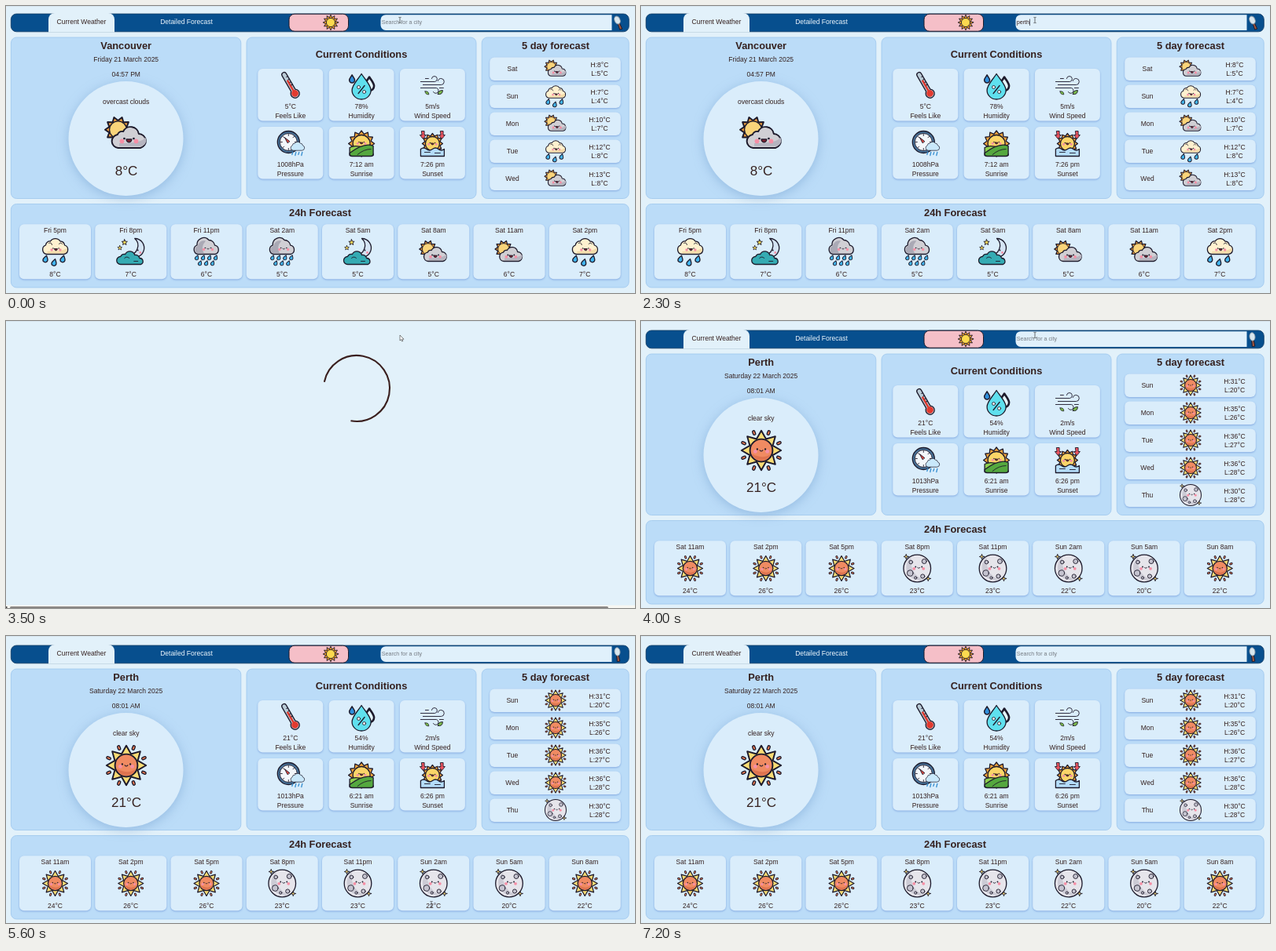
Animation of 800 by 366 pixels, one loop 7300 ms. Source, as an HTML page:

```html
<!DOCTYPE html>
<html lang="en">
<head>
<meta charset="utf-8">
<title>Weather dashboard</title>
<style>
  html, body { margin: 0; width: 100%; height: 100%; overflow: hidden; background: #e2f1fa; }
  svg { display: block; width: 800px; height: 366px; }
  text { font-family: "Liberation Sans", Arial, sans-serif; font-size: 8.53px; fill: #35211f; }
  .mid { text-anchor: middle; }
  .title { font-size: 12.8px; font-weight: bold; }
  .big { font-size: 17.06px; }
  .small { font-size: 7.11px; }
  .panel { fill: #bbdcf8; stroke: #9dc7ee; stroke-width: .8; }
  .card { fill: #daedfb; filter: drop-shadow(0 1.8px .8px #6d94d6b0); }
  .disc { fill: #daedfb; filter: drop-shadow(0 3px 7px #6f9ccc80); }
  .line { stroke: #1d1a2b; stroke-width: 1.3; stroke-linejoin: round; stroke-linecap: round; }
  .thin { stroke-width: .9; }
  .bare { fill: none; }
</style>
</head>
<body>
<svg id="stage" viewBox="0 0 800 366"></svg>
<script>
const LOOP = 7300, LOAD = 3100, SHOW = 3900;
const INK = '#1d1a2b';

// Drawing helpers
const label = (x, y, s, cls = 'mid', extra = '') => `<text x="${x}" y="${y}" class="${cls}" ${extra}>${s}</text>`;
const box = (x, y, w, h, r, cls) => `<rect x="${x}" y="${y}" width="${w}" height="${h}" rx="${r}" class="${cls}"/>`;
const shape = (d, fill, cls = 'line') => `<path d="${d}" fill="${fill}" class="${cls}"/>`;
const dot = (x, y, r, fill, cls = '') => `<circle cx="${x}" cy="${y}" r="${r}" fill="${fill}" class="${cls}"/>`;
const put = (x, y, s, body, turn = 0) => `<g transform="translate(${x} ${y}) rotate(${turn}) scale(${s})">${body}</g>`;
const icon = (name, x, y, s = 1) => `<use href="#${name}" transform="translate(${x} ${y}) scale(${s})"/>`;
const polar = (r, deg) => {
  const a = deg * Math.PI / 180;
  return (r * Math.cos(a)).toFixed(2) + ' ' + (r * Math.sin(a)).toFixed(2);
};
const star = (n, outer, inner, turn = 0) => {
  let d = '';
  for (let i = 0; i < 2 * n; i++) d += (i ? 'L' : 'M') + polar(i % 2 ? inner : outer, turn + i * 180 / n);
  return d + 'Z';
};
const ring = (n, r1, r2, turn = 0) => {
  let d = '';
  for (let i = 0; i < n; i++) d += `M${polar(r1, turn + i * 360 / n)}L${polar(r2, turn + i * 360 / n)}`;
  return d;
};
const drop = (x, y, s, fill, turn = 0) =>
  put(x, y, s, shape('M0-4C1.5-1.5 3 0 3 1.8A3 3 0 0 1-3 1.8C-3 0-1.5-1.5 0-4Z', fill), turn);

const face = (x, y, s = 1, open = true) => put(x, y, s,
  dot(-6, 2.3, 1.9, '#f58fa5') + dot(6, 2.3, 1.9, '#f58fa5') +
  dot(-4, 0, .9, INK) + dot(4, 0, .9, INK) +
  (open ? shape('M-2.2 .6H2.2A2.2 2.6 0 0 1-2.2 .6Z', '#7d2432', 'line thin')
        : shape('M-1.5 1Q0 3 1.5 1', 'none', 'line thin')));

const CLOUD = 'M-7 12A5.7 5.7 0 0 1-7.5 .7A4.5 4.5 0 0 1-2.6-2A7 7 0 0 1 10.6 0A6.1 6.1 0 0 1 12 12Z';
const PUFF = 'M-11 3A6 6 0 0 1-12-8.5A5.5 5.5 0 0 1-6-13.5A7.4 7.4 0 0 1 6.5-13.5A5.8 5.8 0 0 1 12-8.5A5.9 5.9 0 0 1 11 3Z';
const GRAY = 'M-11 3A6 6 0 0 1-12-8.5A8.6 8.6 0 0 1 3-15A8 8 0 0 1 10.5-8.3A5.8 5.8 0 0 1 11 3Z';
const TWINKLE = star(4, 3.2, 1.1);
const STAR = star(5, 3.8, 1.7, -90);

const icons = {
  overcast:
    put(-7, -3.5, 1, shape(star(10, 11, 7.8), '#f4a23e') + dot(0, 0, 7.3, '#fad47a', 'line thin')) +
    shape(CLOUD, '#d0cfd4') + shape('M-6 10.5H12A4.8 4.8 0 0 0 16 3Q14 8-6 8Z', '#b5b4bf', '') + face(2.3, 4),
  showers:
    shape(PUFF, '#fff1cf') + shape('M-10 1.7H11A4.7 4.7 0 0 0 15-5Q12-1-10-.5Z', '#f3dba9', '') +
    shape('M-8-11Q-5-13-4-9M5-10Q7-13 9-10', 'none', 'line thin') + face(1, -4.5, .9) +
    drop(-12, 8.5, 1, '#42b4ee', 15) + drop(-1, 13, 1, '#42b4ee', 15) + drop(10, 8.5, 1, '#42b4ee', 15),
  rain:
    shape(GRAY, '#d0cfd4') + shape('M-11 2A5 5 0 0 1-11-7.5A8 8 0 0 1-1-14Q-8-6-3 2Z', '#aaa9b5', '') +
    face(2, -5, .9, false) +
    [[-12, 7], [-4, 7], [4, 7], [12, 7], [-8, 14], [0, 14], [8, 14]].map(p => drop(...p, .72, '#42b4ee', 20)).join(''),
  night:
    shape('M5-17A12 12 0 1 1-3 4A12 12 0 0 0 5-17Z', '#d4e4f4') +
    dot(9, -2, .9, INK) + dot(12, 1, 1.4, '#f58fa5') +
    put(-8, -12, 1, shape(STAR, '#f9dc58', 'line thin')) + put(-14, -5, .8, shape(STAR, '#f9dc58', 'line thin')) +
    shape('M-13 16A5 5 0 0 1-13 6A5 5 0 0 1-7 3A6.5 6.5 0 0 1 5 4A5 5 0 0 1 11 8A4.2 4.2 0 0 1 13 16Z', '#35abb3') +
    shape('M-8 8Q-5 5-2 8M4 12H9', 'none', 'line thin'),
  sun:
    shape(ring(8, 15.3, 17, 22.5), 'none', 'line" stroke-width="3" style="stroke-width:3') +
    `<path d="${ring(8, 15.3, 17, 22.5)}" stroke="#ee7d54" stroke-width="1.2" stroke-linecap="round"/>` +
    shape(star(8, 16.8, 10.5), '#f9dc74') + dot(0, 0, 9.6, '#f08b62', 'line') +
    shape('M-8 3A8.6 8.6 0 0 0 8 3Q2 8-8 3Z', '#df7450', '') + face(0, -1, .85, false),
  moon:
    dot(0, 0, 17.3, '#e6e5eb', 'line') +
    shape('M-8-14A16.5 16.5 0 0 0 8 14.2Q-9 8-8-14Z', '#cccbd5', '') +
    [[-9, 6, 3.8], [7, 10, 2.6], [9, -9, 3], [-8, -8, 2.3], [-2, 12, 1.6]].map(c => dot(...c, '#c4c3cf', 'line thin')).join('') +
    face(2, -2, 1, false) +
    put(-14, -15, 1, shape(TWINKLE, '#f9dc74', 'line thin')) + put(14, 13, 1, shape(TWINKLE, '#f9dc74', 'line thin')),
  heat: put(0, 0, 1,
    shape('M-3-16A3 3 0 0 1 3-16V7A5.6 5.6 0 1 1-3 7Z', '#b9cbd6') +
    dot(0, 11.5, 4.4, '#e23b30') + shape('M-1.3-8H1.3V9H-1.3Z', '#e23b30', '') +
    shape('M3-12H1M3-8H1M3-4H1M3 0H1', 'none', 'line thin'), -30),
  humid:
    drop(-12, -9, 1.15, '#2f8fdc') + drop(10, -3, 2, '#e4f6fd') +
    shape('M0-15C5-7 12-1 12 6A12 11.5 0 0 1-12 6C-12-1-5-7 0-15Z', '#5fe0ee') +
    shape('M4 0L-4 10', 'none') + dot(-3.5, 2, 2, '#fff', 'line thin') + dot(3.5, 8, 2, '#fff', 'line thin'),
  wind:
    shape('M-15-5H3A3.5 3.5 0 1 0-1-9M-12-1H11A4 4 0 1 0 7-6M-15 3H5A3.5 3.5 0 1 1 1 8M-9-9H-5M9 3H14', 'none', 'line thin') +
    put(10, 9, 1, shape('M-3 2Q-3-3 3-3Q3 3-3 2Z', '#7cbb4c', 'line thin')) +
    put(-7, 9, .8, shape('M-3-2Q3-3 3 3Q-3 3-3-2Z', '#7cbb4c', 'line thin')),
  gauge:
    dot(-2.5, -2, 14, '#456f96', 'line') + dot(-2.5, -2, 11, '#f3f7fb', 'line thin') +
    put(-2.5, -2, 1, shape(ring(8, 8, 10), 'none', 'line thin') + shape('M-1.3 1L-5-6L1.3-1Z', '#e24a40', 'line thin')) +
    put(9, 7, .55, shape(PUFF, '#c9e8fb')) +
    shape('M3 11L2 14M7 11L6 15M11 11L10 14M15 11L14 15', 'none', 'line bare" style="stroke:#368ed0'),
  rise:
    shape(star(12, 16.5, 12.5), '#f5a53c') + put(0, 0, 1, dot(0, 0, 11, '#fbd568', 'line')) + face(0, -2, .8) +
    shape('M-15 5Q-3-1 15 13V15H-15Z', '#8fcf4f') + shape('M-15 12Q4-2 15 3V13Q15 16 12 16H-12Q-15 16-15 13Z', '#55a83f') +
    shape('M-5 14Q3 7 12 7', 'none', 'line thin'),
  set:
    shape(star(12, 13, 10, 0), '#f5a53c') + dot(0, 0, 9, '#fbd568', 'line') + face(0, -1, .8) +
    shape('M-15 7Q-11 4-7.5 7T0 7T7.5 7T15 7V16H-15Z', '#b4dcfa') +
    shape('M-10 11H-3M3 12H10', 'none', 'line thin') +
    [-12, 12].map(x => put(x, -11, 1, shape('M-1.7-5H1.7V0H4L0 5L-4 0H-1.7Z', '#ee5560', 'line thin'))).join('')
};

// City data
const cities = [{
  name: 'Vancouver', date: 'Friday 21 March 2025', time: '04:57 PM', sky: 'overcast clouds', icon: 'overcast', temp: 8, tilt: -22,
  facts: ['5°C', '78%', '5m/s', '1008hPa', '7:12 am', '7:26 pm'],
  days: [['Sat', 'overcast', 8, 5], ['Sun', 'showers', 7, 4], ['Mon', 'overcast', 10, 7], ['Tue', 'showers', 12, 8], ['Wed', 'overcast', 13, 8]],
  hours: [['Fri 5pm', 'showers', 8], ['Fri 8pm', 'night', 7], ['Fri 11pm', 'rain', 6], ['Sat 2am', 'rain', 5],
    ['Sat 5am', 'night', 5], ['Sat 8am', 'overcast', 5], ['Sat 11am', 'overcast', 6], ['Sat 2pm', 'showers', 7]]
}, {
  name: 'Perth', date: 'Saturday 22 March 2025', time: '08:01 AM', sky: 'clear sky', icon: 'sun', temp: 21, tilt: -8,
  facts: ['21°C', '54%', '2m/s', '1013hPa', '6:21 am', '6:26 pm'],
  days: [['Sun', 'sun', 31, 20], ['Mon', 'sun', 35, 26], ['Tue', 'sun', 36, 27], ['Wed', 'sun', 36, 28], ['Thu', 'moon', 30, 28]],
  hours: [['Sat 11am', 'sun', 24], ['Sat 2pm', 'sun', 26], ['Sat 5pm', 'sun', 26], ['Sat 8pm', 'moon', 23],
    ['Sat 11pm', 'moon', 23], ['Sun 2am', 'moon', 22], ['Sun 5am', 'moon', 20], ['Sun 8am', 'sun', 22]]
}];
const factNames = [['Feels Like', 'heat'], ['Humidity', 'humid'], ['Wind Speed', 'wind'], ['Pressure', 'gauge'], ['Sunrise', 'rise'], ['Sunset', 'set']];

const header = tilt =>
  `<rect x="6.3" y="10" width="786" height="22.8" rx="7" fill="#074f8e" stroke="#123a63" stroke-width=".8"/>` +
  shape('M54 33.4V17A8 8 0 0 1 62 9H130A8 8 0 0 1 138 17V33.4Z', '#e2f1fa', '') +
  label(96, 23, 'Current Weather') + label(229.5, 23, 'Detailed Forecast', 'mid', 'style="fill:#eef6fc"') +
  `<rect x="360" y="10.2" width="75.5" height="22" rx="7" fill="#f5bfc8" stroke="${INK}"/>` +
  put(413, 21, 1, shape(star(12, 9.8, 6.5), '#f5a027', 'line thin') + dot(0, 0, 5.6, '#fcd94f', 'line thin')) +
  shape('M770.5 11.2V31H483A6.5 6.5 0 0 1 476.5 24.5V17.7A6.5 6.5 0 0 1 483 11.2Z', '#e0f0fb', '') +
  put(777.5, 18, 1,
    shape('M-1.2 5H1.2L1.6 12.5H-1.6Z', '#a0563f', 'line thin') +
    `<ellipse rx="3.5" ry="5.2" fill="#d8e6ee" stroke="#8b99a6" stroke-width=".9"/>`, tilt);

const dashboard = c => {
  let s = header(c.tilt);
  s += box(6.4, 40, 292.4, 205.5, 7, 'panel') + box(306, 40, 292, 205.5, 7, 'panel') +
    box(605.2, 40, 187, 205.5, 7, 'panel') + box(6.4, 252.5, 785.8, 106.5, 7, 'panel');

  s += label(152.7, 55.3, c.name, 'mid title') + label(152.7, 71.3, c.date) + label(152.7, 89.8, c.time) +
    dot(152.5, 169, 73, '#daedfb', 'disc') + label(152.7, 125.4, c.sky) +
    icon(c.icon, 153, 163, 1.5) + label(153, 216, c.temp + '°C', 'mid big');

  s += label(452, 65.6, 'Current Conditions', 'mid title');
  factNames.forEach(([name, pic], i) => {
    const x = 320.3 + i % 3 * 90.3, y = i < 3 ? 80 : 154, mid = x + 41.5;
    s += box(x, y, 83, 66.5, 6, 'card') + icon(pic, mid, y + 21.5) +
      label(mid, y + 51, c.facts[i]) + label(mid, y + 62.8, name);
  });

  s += label(699, 55.3, '5 day forecast', 'mid title');
  c.days.forEach(([day, pic, hi, lo], i) => {
    const y = 65.5 + i * 35;
    s += box(615.2, y, 166.6, 29.5, 6, 'card') + label(644, y + 17.8, day) + icon(pic, 699, y + 14.5, .78) +
      label(755, y + 12, `H:${hi}°C`) + label(755, y + 23.8, `L:${lo}°C`);
  });

  s += label(399.5, 268.3, '24h Forecast', 'mid title');
  c.hours.forEach(([when, pic, temp], i) => {
    const x = 17 + i * 96.25, mid = x + 45.5;
    s += box(x, 278.2, 91, 70, 6, 'card') + label(mid, 288.5, when) +
      icon(pic, mid, 313.5, pic === 'sun' ? .95 : 1) + label(mid, 345, temp + '°C');
  });
  return s;
};

const hint = y => label(477.8, y, 'Search for a city', 'small', 'style="fill:#757b82"');
const stage = document.getElementById('stage');
stage.innerHTML =
  '<defs>' + Object.entries(icons).map(([k, v]) => `<g id="${k}">${v}</g>`).join('') + '</defs>' +
  '<rect width="800" height="366" fill="#e2f1fa"/><rect width="800" height=".8" fill="#d5e2ec"/>' +
  `<g id="first">${dashboard(cities[0])}<g id="hint">${hint(23.4)}</g>` +
  label(477.8, 23.4, '', 'small', 'id="query"') + `<rect id="caret" y="16.6" width=".7" height="8.4" fill="${INK}"/></g>` +
  `<g id="loader"><path id="arc" d="M${polar(42, -169)}A42 42 0 1 1 ${polar(42, 100)}" fill="none" stroke="#3a1f1e" stroke-width="2.1"/>` +
  '<rect y="362.5" width="800" height="3.5" fill="#f7f7f2"/><rect y="364" width="1.5" height="2" fill="#444"/>' +
  '<rect x="5" y="364" width="761" height="3" rx="1.5" fill="#8a8785"/></g>' +
  `<g id="second" transform="translate(0 2)">${dashboard(cities[1])}${hint(23.4)}</g>` +
  `<path id="beam" d="M-1.6-3.6H-.4L0-3.2L.4-3.6H1.6M0-3.2V3.2M-1.6 3.6H-.4L0 3.2L.4 3.6H1.6" fill="none" stroke="#333" stroke-width=".7"/>` +
  `<path id="arrow" d="M0 0V7L1.6 5.6L2.7 8L3.8 7.5L2.8 5.2H5Z" fill="#fff" stroke="#333" stroke-width=".6"/>`;

const el = id => document.getElementById(id);
const [first, second, loader, arc, query, caret, prompt, beam, arrow] =
  ['first', 'second', 'loader', 'arc', 'query', 'caret', 'hint', 'beam', 'arrow'].map(el);
const show = (node, on) => { node.style.display = on ? '' : 'none'; };
const move = (node, x, y) => node.setAttribute('transform', `translate(${x} ${y})`);

// Time of focus, then of each key
const keys = [500, 900, 1300, 1500, 1800, 2000];
const widths = [0, 4, 8, 10.3, 12.3, 16.2];
// Pointer: time, x, y
const path = [[0, 501, 18], [4200, 501, 18], [4900, 541, 342], [5800, 541, 342], [6450, 552, -10], [LOOP, 552, -10]];

const pointer = t => {
  const i = Math.max(1, path.findIndex(p => p[0] > t));
  const [t0, x0, y0] = path[i - 1], [t1, x1, y1] = path[i];
  const k = (t - t0) / (t1 - t0), e = k * k * (3 - 2 * k);
  return [x0 + (x1 - x0) * e, y0 + (y1 - y0) * e];
};

function draw(t) {
  const loading = t >= LOAD && t < SHOW;
  show(first, t < LOAD);
  show(loader, loading);
  show(second, t >= SHOW);

  const n = keys.filter(k => k <= t).length - 1;
  show(prompt, n < 1);
  query.textContent = 'perth'.slice(0, Math.max(0, n));
  show(caret, n >= 0 && (t - keys[n]) % 1000 < 500);
  caret.setAttribute('x', 478 + (widths[n] || 0));

  arc.setAttribute('transform', `translate(446 86) rotate(${(t - 3500) * .36})`);

  const [x, y] = pointer(t);
  const onText = !loading && (y < 32 && t < 4500 || y > 337);
  show(beam, onText);
  show(arrow, !onText);
  move(beam, x, y);
  move(arrow, x, y);
}

const start = performance.now();
function tick() {
  draw((performance.now() - start) % LOOP);
  requestAnimationFrame(tick);
}
tick();
</script>
</body>
</html>
```
